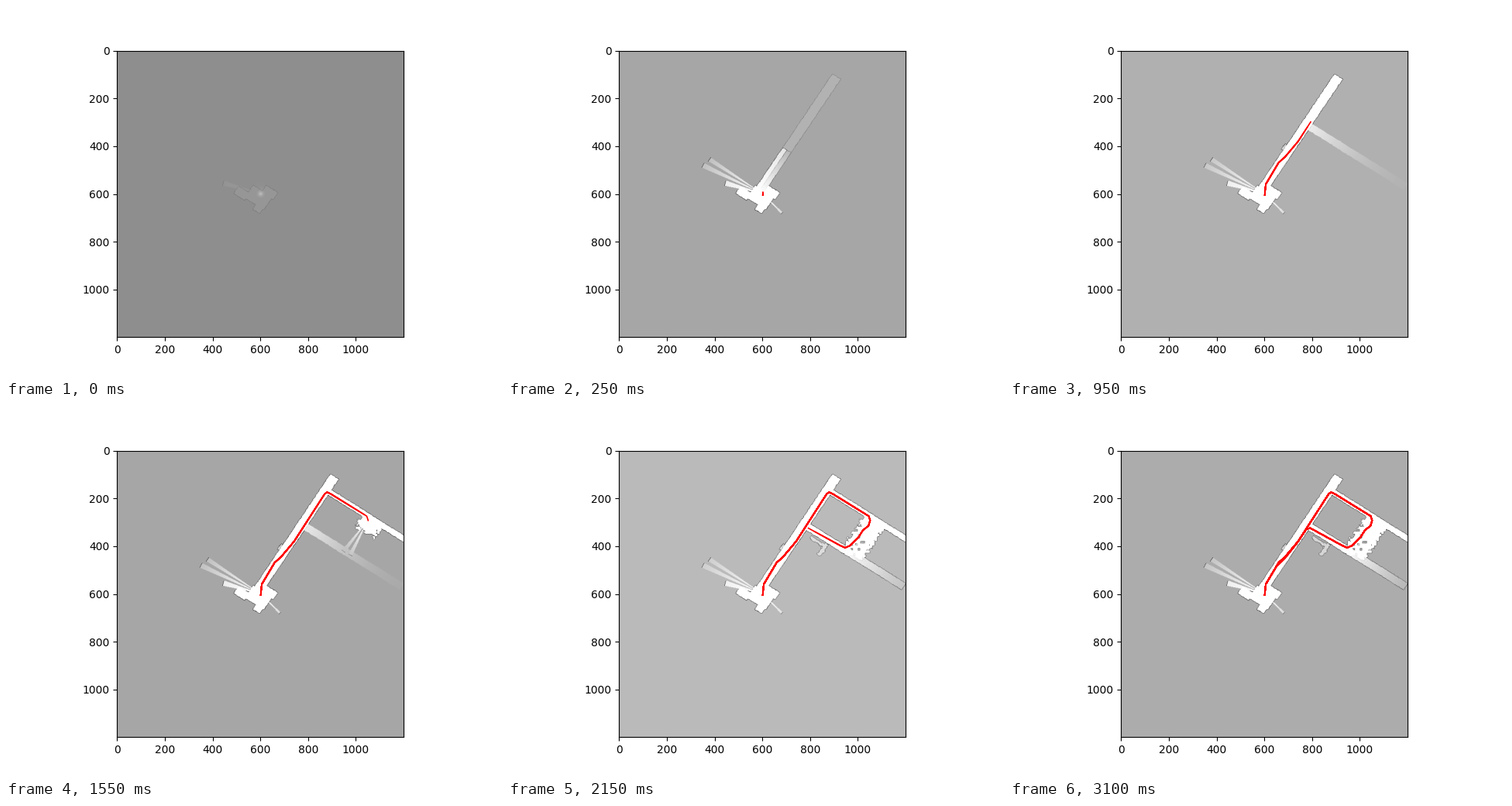
A matplotlib script for the animation above (3200 ms loop, 640 by 480 pixels).

```python
import numpy as np
import matplotlib.pyplot as plt
from matplotlib.animation import FuncAnimation

SIZE, N = 1200, 600          # map extent in cells, raster resolution
STEP, FRAMES = 50, 64        # ms per frame, frames per loop
LAST = 62                    # the final pose is held for one extra frame

rng = np.random.default_rng(4)

# The building is a grid of corridors: a runs across, b along the long one.
HOME = np.array([602, 601])
tilt_a, tilt_b = np.radians([32, 34])
ACROSS = np.array([np.cos(tilt_a), np.sin(tilt_a)])
ALONG = np.array([np.sin(tilt_b), -np.cos(tilt_b)])


def to_map(a, b):
    return HOME[:, None] + np.outer(ACROSS, a) + np.outer(ALONG, b)


def noise(k, low, high):
    """Random field made of k by k blocks."""
    return np.kron(rng.uniform(low, high, (N // k, N // k)), np.ones((k, k)))


axis = (np.arange(N) + 0.5) * SIZE / N
X, Y = np.meshgrid(axis, axis)
to_grid = np.linalg.inv(np.column_stack([ACROSS, ALONG]))
A, B = np.tensordot(to_grid, [X - HOME[0], Y - HOME[1]], 1)
A += noise(4, -1, 1)
B += noise(4, -1, 1)
wobble_a, wobble_b = noise(5, -1, 1), noise(5, -1, 1)
dashes = noise(3, 0.5, 1)
clutter = noise(5, 0, 1) > 0.12


def box(a0, a1, b0, b1, rough=0):
    a, b = A + rough * wobble_a, B + rough * wobble_b
    return (a > a0) & (a < a1) & (b > b0) & (b < b1)


def fall(x, far, power=1.0):
    """Brightness along a beam, from 1 at x = 0 to far at x = 1."""
    return far + (1 - far) * (1 - np.clip(x, 0, 1)) ** power


def outline(mask):
    grown = mask.copy()
    for ax in (0, 1):
        for d in (-1, 1):
            grown |= np.roll(mask, d, ax)
    return grown & ~mask


def layer(mask, start, span, glow=1.0, wall=0.9):
    """Free area and its wall, brightening from start over span ms."""
    free = (mask * glow).astype(np.float32)
    rim = (outline(mask) * dashes * wall).astype(np.float32)
    return free, rim, start, span


def beam(origin, angle, spread, reach, start, span, far):
    dx, dy = X - origin[0], Y - origin[1]
    r = np.hypot(dx, dy)
    off = (np.degrees(np.arctan2(dy, dx)) - angle + 180) % 360 - 180
    mask = (np.abs(off) < spread / 2) & (r < reach)
    return layer(mask, start, span, fall(r / reach, far), 0.9 * (r > reach))


room = (box(-46, 48, -50, 14) | box(0, 57, 8, 42) | box(9, 43, -72, -40)
        | box(-94, -40, -58, -22))
dist_home = np.hypot(X - HOME[0], Y - HOME[1])
turn = to_map([200], [501])[:, 0]
side = box(0, 472, 323, 354)

layers = [
    # start room and the beams leaving it
    layer(room, -15, 215),
    layer(dist_home < 60, -1, 1, 0.5 * np.exp(-dist_home / 10), 0),
    beam(HOME, 213, 4, 264, 0, 250, 0.3),
    beam(HOME, 205.5, 4.5, 276, 0, 250, 0.3),
    beam(HOME, 196, 8, 162, -15, 215, 0.8),
    beam(HOME, 45, 4.5, 113, 0, 250, 0.6),
    # long corridor: near part first, then all of it
    layer(box(-38, -19, 0, 208), 50, 200, fall(B / 208, 0.7)),
    layer(box(-19, 2, 0, 208), 50, 200, fall(B / 208, 0.2), 0.5),
    layer(box(-38, 2, 0, 580), 150, 750),
    layer(box(-46, -36, 196, 222), 500, 400, 0.5),
    # side corridor: glimpsed from the junction, later driven through
    layer(side, 650, 300, 0.75 * fall(A / 472, 0.06, 1.8), 0),
    layer(box(0, 190, 323, 354), 1580, 470),
    layer(side & (A > 170), 1650, 300, fall((A - 190) / 282, 0.15, 1.3), 0.7),
    layer(box(36, 100, 300, 312, 4) | box(98, 114, 260, 322, 4),
          1850, 300, 0.5, 0.6),
    # upper corridor and the cluttered corner behind it
    layer(box(0, 200, 501, 526), 950, 300),
    layer(box(165, 400, 501, 525), 1050, 400),
    layer(box(168, 262, 450, 512, 12), 1300, 220, wall=0.6),
    beam(turn, 128, 6, 166, 1400, 150, 0.25),
    beam(turn, 117, 6, 164, 1400, 150, 0.35),
    layer(box(170, 266, 335, 505, 10) & clutter, 1600, 250, wall=0.6),
]

# a lap: up the long corridor, around the block and back
route = to_map(*np.transpose([
    (2, -3), (-4, 7), (-20, 38), (-26, 143), (-17, 178), (-8, 262),
    (-13, 498), (-9, 510), (7, 512), (185, 513), (200, 501), (207, 478),
    (198, 450), (199, 414), (189, 366), (177, 348), (155, 345), (2, 336),
    (-8, 322), (-8, 254), (-14, 174), (-25, 118)]))
dist = np.r_[0, np.cumsum(np.hypot(*np.diff(route)))]


def trail(t):
    end = np.interp(t, [0, 250, 950, 1550, 2150, 3100],
                    [0, 12, 369, 734, 1069, dist[-1]])
    s = np.r_[dist[dist < end], end]
    return [np.interp(s, dist, c) for c in route]


def unknown(t):
    """Grey of unseen cells; it jumps when the value range is rescaled."""
    if t < 1600:
        grey = 176 - 34 * np.exp(-t / 215) - max(t - 950, 0) / 60
    else:
        grey = 190 - 18 * ((t - 1600) / 1500) ** 1.5
    return np.float32(grey / 255)


def render(t):
    free = np.zeros((N, N), np.float32)
    wall = np.zeros((N, N), np.float32)
    for area, rim, start, span in layers:
        v = np.float32(np.clip((t - start) / span, 0, 1))
        if v > 0:
            np.maximum(free, area * v, out=free)
            np.maximum(wall, rim * np.sqrt(v), out=wall)
    return free + (1 - free) * (1 - wall) * unknown(t)


fig, ax = plt.subplots(figsize=(6.4, 4.8), dpi=100)
image = ax.imshow(render(0), cmap="gray", vmin=0, vmax=1,
                  extent=(-0.5, SIZE - 0.5, SIZE - 0.5, -0.5))
# every step redraws the trail on top of the older ones
trails = [ax.plot(*trail(i * STEP), color="red", lw=1.2)[0]
          for i in range(LAST + 1)]
ax.set(xlim=(-0.5, SIZE - 0.5), ylim=(SIZE - 0.5, -0.5))


def update(i):
    i = min(i, LAST)
    image.set_data(render(i * STEP))
    for k, line in enumerate(trails):
        line.set_visible(0 < k <= i)
    return [image, *trails]


anim = FuncAnimation(fig, update, frames=FRAMES, interval=STEP,
                     repeat=True, repeat_delay=0, blit=False)
plt.show()
```
